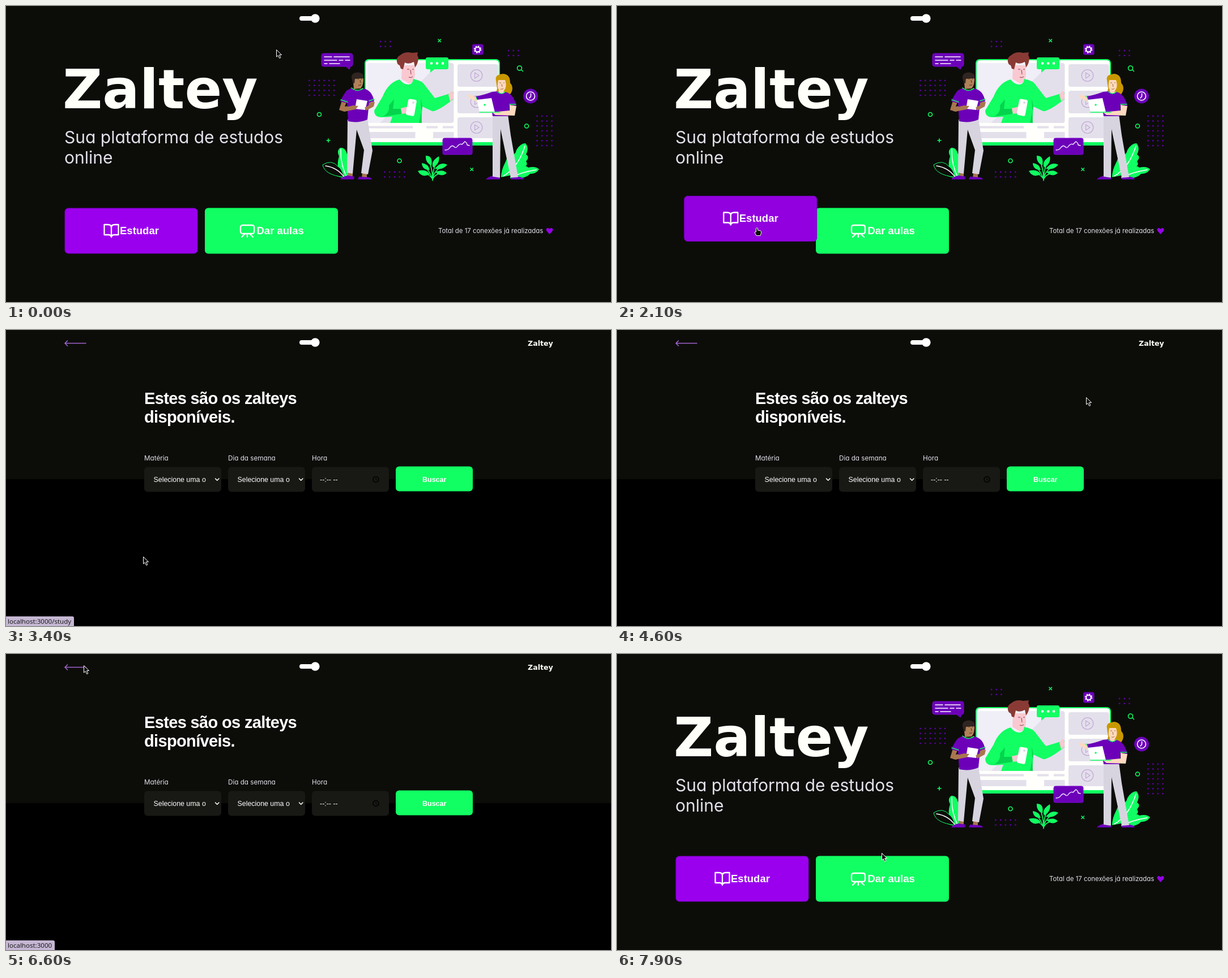
These frames come from a looping animation (1068 px wide and 524 px high, 8000 ms). An HTML page:

```html
<!DOCTYPE html>
<html lang="pt">
<head>
<meta charset="utf-8">
<title>Zaltey</title>
<style>
html, body { margin: 0; height: 100%; overflow: hidden; background: #0c0d09; }
svg { display: block; width: 100%; height: 100%; }
text { fill: #fff; }
.brand { font: bold 97px "DejaVu Sans", sans-serif; fill: #fffffa; }
.round { font-family: Inter, sans-serif; font-feature-settings: "cv11"; fill: #e4e0ea; }
.bold { font: bold 18.5px "Liberation Sans", sans-serif; }
.title { font-size: 29px; letter-spacing: -.65px; }
.field { font: 12.4px "Liberation Sans", sans-serif; }
.p { fill: #6c00b9; }
.g { fill: #11ff62; }
.grey { fill: #e3e0eb; }
.pants { fill: #d8d4df; }
.line { fill: none; stroke: #fff; stroke-width: 1.6; stroke-linecap: round; stroke-linejoin: round; }
.gl { stroke: #11ff62; }
.icon { stroke-width: 2.3; }
.play { stroke: #c5acd8; stroke-width: 1.3; }
</style>
</head>
<body>
<svg viewBox="0 0 1068 524">
<rect width="1068" height="524" fill="#0c0d09"/>

<g id="home">
  <text class="brand" x="100" y="181">Zaltey</text>
  <text class="round" font-size="30" x="103" y="243">Sua plataforma de estudos</text>
  <text class="round" font-size="30" x="103" y="279">online</text>

  <g id="dots" fill="#5b00a3"/>

  <!-- plants -->
  <g class="g">
    <path d="M597 304C581 290 586 274 588 266Q583 256 590 251Q599 250 602 262L612 270L607 304Z"/>
    <path d="M604 305Q578 303 574 292Q582 285 589 290L588 282Q599 284 608 301Z"/>
    <path d="M874 303C875 285 882 278 884 270Q893 271 893 263Q899 264 901 255Q908 243 917 243Q924 251 918 263Q925 267 918 275Q923 282 913 286Q914 294 900 298Z"/>
    <path d="M890 303Q899 288 910 289Q915 280 922 286Q935 283 941 289Q935 298 925 297Q917 307 890 305Z"/>
    <path d="M741 265Q754 265 751 282Q740 278 741 265ZM764 266Q767 278 754 286Q749 275 764 266ZM734 278Q745 279 748 290Q735 291 734 278ZM727 292Q742 288 748 298Q734 305 727 292ZM757 288Q767 275 779 281Q771 291 757 288ZM758 294Q772 288 778 296Q768 304 758 294Z"/>
  </g>
  <path class="line gl" d="M753 309Q754 292 746 272M753 307Q753 289 762 272M753 307Q749 294 738 282M753 306Q746 296 732 294M753 305Q757 289 774 282M753 307Q758 295 774 297"/>
  <path class="line" stroke-width="1" d="M591 254Q590 280 602 304M878 301Q904 286 916 248M892 303Q911 294 936 290"/>
  <path d="M597 303Q562 299 559 281Q575 271 586 284Q593 288 597 303Z" fill="#0c0d09" stroke="#11ff62"/>
  <path class="line" stroke-width=".8" d="M564 283Q585 286 597 303"/>

  <!-- screen -->
  <rect class="g" x="633" y="94" width="239" height="153" rx="7"/>
  <path d="M641 96H864Q870 96 870 102V241H635V102Q635 96 641 96Z" fill="#fffffc"/>
  <rect class="grey" x="638" y="101" width="152.500" height="106" rx="4"/>
  <path d="M642 101H765L660 207H638V105Q638 101 642 101Z" fill="#f0eef7"/>
  <path class="grey" d="M640 212.500H718V216.500H640ZM742 212.500H762V216.500H742ZM771 212.500H790V216.500H771ZM640 223H722.500V234H640ZM754 223H790.500V234H754Z"/>
  <g id="cards"></g>

  <!-- teacher -->
  <path d="M699 105H721L722 121Q720 137 711 137L698 129Z" fill="#f9c8d0"/>
  <path class="g" d="M695 130C680 134 671 145 665 160L650 185Q650 197 663 197L682 196L678 207H733L735 178L752 186Q760 188 790 165V153L757 163L740 141Q735 132 719 129Q718 138 711 139Q701 139 695 130Z"/>
  <path d="M676 176L685 165L683 182L697 182L698 191L664 196Q678 190 676 176ZM735 178L732 163L734 207H729Z" fill="#05d34d"/>
  <path d="M697 181L714 177L719 188L699 191ZM781 157L786 150Q791 151 790 164L784 169Z" fill="#f9c8d0"/>
  <path d="M690 99Q688 91 696 87Q704 80 717 83L727 82Q725 88 728 91Q728 101 722 109L720 99Q710 104 704 100L701 112L697 111L695 105Q691 104 690 99Z" fill="#8a3a34"/>
  <rect x="708" y="165" width="15" height="29" rx="3" fill="#fff" transform="rotate(10 715 179)"/>
  <circle cx="719" cy="171" r="2" fill="#dcd9e4"/>
  <path d="M708 112h4m5 0h3M714 113l1 8m-4 5q4 2 7-1" fill="none" stroke="#853c42"/>

  <!-- bubbles and badges -->
  <path class="g" d="M744 91H778Q781 91 781 94V109Q781 112 778 112H756L749 118V112H744Q741 112 741 109V94Q741 91 744 91Z"/>
  <path class="line" stroke-width="5" style="stroke-width:4.600" d="M751 101.500h.01M761 101.500h.01M771 101.500h.01"/>
  <path class="p" stroke="#7d0bd0" d="M561 84H608Q612 84 612 88V103Q612 107 608 107L606 112L600 107H561Q557 107 557 103V88Q557 84 561 84Z"/>
  <path class="line" d="M562 90H575M579 90H606M562 96H584M588 96H595M599 96H607M562 102H567M571 102H589"/>
  <rect class="p" x="823" y="67.500" width="19.500" height="19" rx="3"/>
  <circle cx="832.500" cy="77" r="4.300" class="line" style="stroke-width:2"/>
  <circle cx="832.500" cy="77" r="5.900" fill="none" stroke="#fff" stroke-width="1.800" stroke-dasharray="2.300 2.334"/>
  <circle class="p" cx="926" cy="159.500" r="13"/>
  <circle class="line" cx="926" cy="159.500" r="7.500"/>
  <path class="line" d="M926.500 155V160L924 163"/>
  <rect class="p" x="771" y="234" width="52" height="29" rx="3" stroke="#7d0bd0"/>
  <path class="line" style="stroke-width:1.300" d="M775 255Q781 255 784 250Q788 245 792 250Q795 252 798 247Q802 243 805 245L810 240Q814 242 814 246L818 247"/>
  <g class="line gl">
    <circle cx="553" cy="192" r="3.500"/><circle cx="919" cy="212.500" r="3.500"/><circle cx="694.500" cy="274" r="3.500"/>
    <circle cx="906.500" cy="110" r="4"/>
    <path d="M909.500 113L912.500 115.500M763 59L767.500 63.500M767.500 59L763 63.500M820 287L824.500 291.500M824.500 287L820 291.500M566 238H572M569 235V241"/>
  </g>

  <!-- left student -->
  <path d="M604 293H612V303H603ZM629 295H637V305H628Z" fill="#a8764f"/>
  <path class="p" d="M603 300L615 302L614 307H590Q593 302 603 300ZM623 302L637 303Q645 303 646 307H621Z"/>
  <path class="pants" d="M603 201L638 199L643 232L647 256L639 298L627 296L632 255L619 219L612 297L602 295Z"/>
  <path d="M612 124L631 125Q632 140 626 146L614 147Z" fill="#b18259"/>
  <path d="M610 127Q609 118 622 117.500Q633 119 631 128L616 129L615 137L612 136Z" fill="#302521"/>
  <path d="M594 164L588 184L597 187L618 181L615 175L598 178L602 168ZM640 161L647 172L636 183L634 177L640 172L634 164Z" fill="#a8764f"/>
  <path class="p" d="M610 145L601 150Q594 159 590 169L602 172L604 204Q622 208 638 201L641 171L650 169Q646 148 630 146Q619 154 610 145Z"/>
  <path class="line gl" d="M610 145Q620 153 630 146M591 166L603 170M641 168L650 165"/>
  <path d="M619 165L638 168L634 184L616 182Z" fill="#fff"/>
  <path d="M597 187L617 183L622 177L613 176L596 180ZM633 180L640 176L645 169L651 170L649 178L636 185Z" fill="#a8764f"/>
  <path d="M620 129h3m4 0h2M625 131l1 5m-4 4q3 1 5-1" stroke="#4b2c20" fill="none"/>

  <!-- right student -->
  <path class="p" d="M861 300L872 303V307H847Q851 302 861 300ZM891 301L905 302Q913 303 914 307H891Z"/>
  <path class="pants" d="M859 192H886L891 229L904 303L891 304L873 218L872 304L859 302Z"/>
  <path d="M865 132Q862 121 878 120Q890 121 890 136Q896 143 893 151Q889 162 875 159Q862 156 867 147Z" fill="#c99800"/>
  <path d="M869 131L881 131Q885 143 879 150L878 156H869L870 148Q866 145 869 131Z" fill="#ffd9bd"/>
  <path class="p" d="M869 151L858 152Q842 158 829 160L833 171L855 166L859 195H887L889 174L901 177Q896 155 881 152Q875 159 869 151Z"/>
  <path class="line gl" d="M868 152Q875 158 881 152M829 160L833 170M889 174L900 174"/>
  <path d="M829 161L819 157L814 158L820 164L832 170ZM889 175L901 177L898 194L864 193L858 188L889 185Z" fill="#ffd9bd"/>
  <path d="M831 166L857 163L863 188L836 188Z" fill="#fff"/>
  <path class="line gl" d="M836 188H872"/>
  <circle class="g" cx="845" cy="175" r="1.800"/>
  <path d="M871 136h3m4 0h2M875 138l1 5m-3 4q3 1 5-1" stroke="#a46540" fill="none"/>

  <g>
    <rect class="g" x="351" y="357.500" width="235" height="81" rx="6"/>
    <path class="line icon" d="M418 388H434Q438 388 438 392V399Q438 403 434 403H418Q414 403 414 399V392Q414 388 418 388ZM421 404L416 409M426 404V409M431 404L436 409"/>
    <text class="bold" x="442.500" y="404">Dar aulas</text>
  </g>
  <g id="study">
    <rect id="face" x="104" y="358" width="234" height="80" rx="6" stroke="#7900bd"/>
    <path class="line icon" d="M173.500 387H180Q186 387 186 392V409Q185 405 181 405H173.500ZM198.500 387H192Q186 387 186 392V409Q187 405 191 405H198.500Z"/>
    <text class="bold" x="201" y="404">Estudar</text>
  </g>
  <text class="round" font-size="11.400" x="763" y="402">Total de 17 conexões já realizadas</text>
  <path d="M959.500 404L954.500 398.500Q952 394 956 393Q958.500 393 959.500 395Q960.500 393 963 393Q967 394 964.500 398.500Z" fill="#9600e8"/>
</g>

<g id="search">
  <rect y="264" width="1068" height="260" fill="#000"/>
  <path class="line" style="stroke:#a263cf" d="M141 23.500H104M108.500 19L104 23.500L108.500 28"/>
  <text class="brand" style="font-size:12.600px" x="921" y="28">Zaltey</text>
  <text class="bold title" x="244" y="131">Estes são os zalteys</text>
  <text class="bold title" x="244" y="164">disponíveis.</text>
  <g id="fields"></g>
  <text class="field" x="554" y="269">--:-- --</text>
  <circle cx="653" cy="264.500" r="5" fill="none" stroke="#000" stroke-width="1.500"/>
  <path d="M653 261.500V265L655.500 266" fill="none" stroke="#000"/>
  <rect class="g" x="688" y="241.500" width="136" height="44" rx="6"/>
  <text class="bold" style="font-size:12.500px" x="735" y="268.500">Buscar</text>
</g>

<rect x="518" y="18" width="34" height="8" rx="4" fill="#fff"/>
<circle cx="545.800" cy="22" r="7.800" fill="#fff"/>

<g id="status">
  <path id="tab" fill="#c5b7d3"/>
  <text id="link" x="3" y="519.500" style="font:11.600px 'Open Sans',sans-serif;fill:#111"></text>
</g>

<g id="cursor" fill="#0b0b0b" stroke="#fff" stroke-linejoin="round">
  <path id="arrow" d="M.5 .5V13L3.300 10.500L5.700 15.500L7.800 14.500L5.600 9.500H9.500Z"/>
  <path id="hand" d="M-.5 8V1.500Q1 0 2.500 1.500V5L7.500 6Q9 7 8.500 10L7 14.500H0L-3 9Q-2 7 -.5 8Z"/>
</g>
</svg>
<script>
const $ = id => document.getElementById(id);
const show = (id, on) => $(id).style.display = on ? '' : 'none';

// left, top, columns, rows, spacing
const grids = [[661, 63, 3, 2, 8.7], [535.5, 132, 6, 4, 8.7], [887, 79, 3, 2, 8.7],
  [937.5, 195, 4, 7, 8.7], [668.5, 294, 5, 2, 8.7]];
$('dots').innerHTML = grids.map(([x, y, cols, rows, gap]) =>
  Array.from({ length: cols * rows }, (_, i) =>
    `<circle cx="${x + i % cols * gap}" cy="${y + Math.floor(i / cols) * gap}" r="1.4"/>`).join('')).join('');

$('cards').innerHTML = [[103, 40, 123], [150, 40, 169.5], [197, 37, 215]].map(([y, h, mid]) =>
  `<rect class="grey" x="797" y="${y}" width="72" height="${h}" rx="4"/>
   <circle class="line play" cx="830.5" cy="${mid}" r="10.3"/>
   <path class="line play" d="M827.5 ${mid - 5}V${mid + 5}L835 ${mid}Z"/>`).join('');

$('fields').innerHTML = ['Matéria', 'Dia da semana', 'Hora'].map((label, i) => {
  const x = 244 + i * 148;
  return `<text class="round" font-size="11.7" x="${x}" y="231">${label}</text>
    <rect x="${x}" y="242.500" width="136" height="44" rx="6" fill="#181815"/>` +
    (i < 2 ? `<text class="field" x="${x + 16.5}" y="269">Selecione uma o</text>
    <path class="line" d="M${x + 125.5} 263l3.200 3.200l3.200 -3.200"/>` : '');
}).join('');

// pointer path: time, x, y
const path = [[0, 477, 77], [800, 477, 77], [900, 431, 97], [1000, 431, 97], [1100, 335, 159],
  [1300, 335, 159], [1400, 283, 239], [1500, 283, 239], [1600, 254, 362], [1800, 247, 383],
  [2400, 244, 400], [3300, 244, 400], [3400, 242, 401], [3500, 242, 401], [3800, 398, 308],
  [4500, 941, 137], [4600, 828, 119], [4800, 596, 91], [5100, 596, 91], [5500, 322, 52],
  [5600, 322, 52], [6000, 181, 30], [6200, 139, 22], [6400, 137, 20], [7100, 137, 20],
  [7300, 437, 272], [7500, 437, 272], [7900, 467, 352], [8000, 467, 352]];

function pointer(t) {
  const i = path.findIndex(k => k[0] > t);
  const [t0, x0, y0] = path[i - 1], [t1, x1, y1] = path[i];
  const p = (t - t0) / (t1 - t0);
  return [x0 + (x1 - x0) * p, y0 + (y1 - y0) * p].map(Math.round);
}

function draw(now) {
  // the screen refreshes ten times a second
  const t = Math.floor(now % 8000 / 100) * 100;
  const within = (a, b) => t >= a && t < b;

  const searching = within(3400, 6800);
  show('home', !searching);
  show('search', searching);

  const x = within(1500, 3400) ? Math.min(1, (t - 1500) / 900) : 0;
  const lift = 1 - (1 - x) ** 2;
  $('study').setAttribute('transform', `translate(${16.6 * lift} ${-24.2 * lift})`);
  $('face').setAttribute('fill', `rgb(${155 - 10 * lift},0,${238 - 17 * lift})`);

  const study = within(2200, 3700), back = within(6400, 7200);
  show('status', study || back);
  $('link').textContent = 'localhost:3000' + (study ? '/study' : '');
  $('tab').setAttribute('d', `M0 507H${study ? 117 : 83}q3 0 3 3V524H0Z`);

  const hand = within(1600, 3400) || within(6200, 6600);
  show('cursor', !within(4000, 4600));
  show('hand', hand);
  show('arrow', !hand);
  $('cursor').setAttribute('transform', `translate(${pointer(t)})`);
  requestAnimationFrame(draw);
}
requestAnimationFrame(draw);
</script>
</body>
</html>
```
